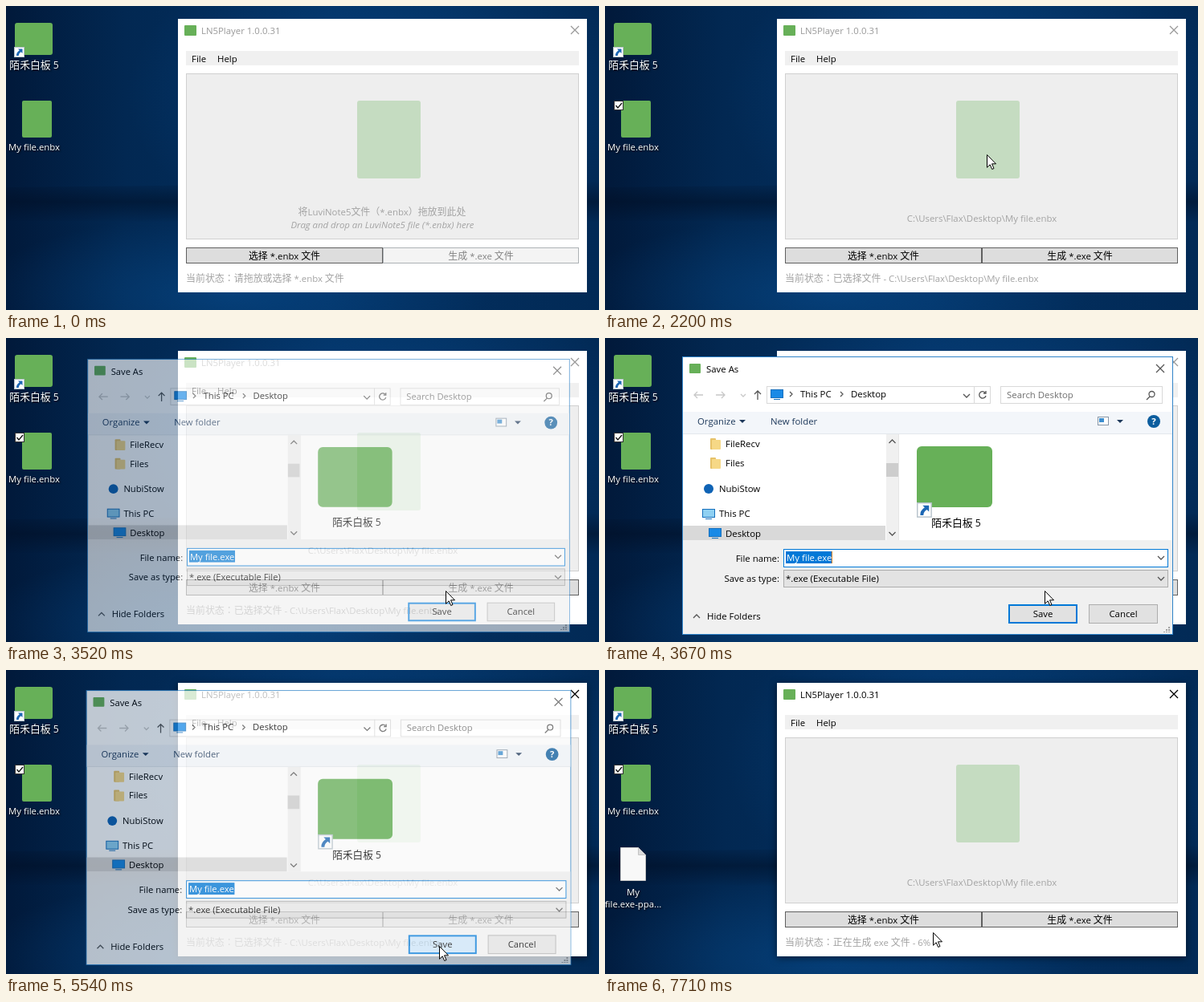
An HTML page that plays this animation: 738 px wide and 379 px high, repeating every 8000 ms.

```html
<!DOCTYPE html>
<html lang="zh-Hant">
<head>
<meta charset="utf-8">
<title>File packer demo</title>
<style>
  html, body { margin: 0; width: 100%; height: 100%; overflow: hidden; background: #021a3d; }
  svg { display: block; width: 738px; height: 379px; }
  text { font: 11.4px "Open Sans", "Noto Sans CJK TC", "Noto Sans CJK", sans-serif; white-space: pre; }
  .label { fill: #fff; text-anchor: middle; filter: drop-shadow(1px 1px 1px #000); }
  .name { font-size: 12.2px; }
  .mid { text-anchor: middle; }
  .end { text-anchor: end; }
  .dim { fill: #a3a3a3; }
  .navy { fill: #1e395b; }
  .line { fill: none; stroke: #555; stroke-width: 1.3; }
</style>
</head>
<body>
<svg id="stage" viewBox="0 0 738 379" xmlns="http://www.w3.org/2000/svg"></svg>
<script>
const LOOP = 8000;
const GREEN = '#67b058';
const BLUE = '#0078d7';

// [first change, last change, steps]
const changes = [
  [410, 1120, 10], [1270, 1650, 6], [2200, 2200, 1], [2430, 3120, 10],
  [3350, 3670, 5], [4070, 4070, 1], [4300, 4690, 6], [4840, 5150, 5],
  [5320, 5780, 7], [6310, 6390, 2], [6710, 7480, 11], [7550, 7710, 3]
].flatMap(([a, b, n]) => Array.from({ length: n }, (_, i) => Math.round(a + (b - a) * i / (n - 1 || 1))));

const cursorPath = [
  [410, 571, 349], [570, 470, 300], [800, 190, 190], [960, 60, 145], [1040, 34, 138],
  [1270, 34, 138], [1350, 90, 145], [1500, 350, 172], [1650, 474, 182],
  [2430, 476, 186], [2660, 515, 250], [2890, 543, 307], [3120, 547, 315],
  [4300, 547, 315], [4530, 492, 321], [4612, 492, 321], [4690, 489, 321],
  [4840, 496, 325], [5070, 538, 348], [5150, 539, 344],
  [6710, 539, 344], [7100, 480, 340], [7480, 422, 346], [7550, 420, 344], [7710, 408, 327]
];
const fade = [[3349, 0], [3350, .12], [3430, .38], [3510, .65], [3590, .88], [3670, 1],
  [5397, 1], [5473, .75], [5550, .5], [5627, .25], [5780, 0]];
const scale = [[3350, .95], [3510, .983], [3670, 1], [5397, 1], [5780, .94]];
const percentTimes = [6710, 6900, 7080, 7240, 7400, 7600];

function sample(keys, t) {
  const next = keys.findIndex(k => k[0] > t);
  if (next === 0) return keys[0].slice(1);
  if (next < 0) return keys[keys.length - 1].slice(1);
  const a = keys[next - 1], b = keys[next], p = (t - a[0]) / (b[0] - a[0]);
  return a.slice(1).map((v, i) => v + (b[i + 1] - v) * p);
}

const mixed = s => s.replace(/[\u3000-\u9fff\uff00-\uffef]+/g, m => `<tspan font-size="1.05em">${m}</tspan>`);
const text = (x, y, s, cls = '', more = '') => `<text x="${x}" y="${y}" class="${cls}" ${more}>${mixed(s)}</text>`;
const rect = (x, y, w, h, fill, more = '') => `<rect x="${x}" y="${y}" width="${w}" height="${h}" fill="${fill}" ${more}/>`;
const box = (x, y, w, h, fill, stroke, more = '') => rect(x + .5, y + .5, w - 1, h - 1, fill, `stroke="${stroke}" ${more}`);
const line = (d, more = '') => `<path d="${d}" class="line" ${more}/>`;
const chevron = (x, y, dy = 4) => line(`M${x - 4} ${y - dy / 2}l4 ${dy} 4 ${-dy}`);
const cross = (x, y, id = '') => line(`M${x - 5} ${y - 5}l10 10m0-10l-10 10`, id && `id="${id}"`);
const triangle = (x, y) => `<path d="M${x - 4} ${y - 2}h8l-4 4z" fill="#1e395b"/>`;
const monitor = (x, y, fill = '#1a8ae6') =>
  box(x, y, 16, 11, fill, '#1670bd') + rect(x + 4, y + 12, 8, 1, '#1670bd');
const folder = (x, y) => rect(x, y, 7, 14, '#e6c269', 'rx="1"') + rect(x + 2, y + 2, 11, 12, '#f6d886', 'rx="1"');
const shortcut = (x, y, s, id = '') => `<g transform="translate(${x} ${y}) scale(${s})" ${id && `id="${id}"`}>` +
  box(0, 0, 13, 13, '#fff', '#b8c4cc') +
  `<path d="M5 2.5h5.5V8L8.7 6.200Q6 7.500 5.700 11H3Q2.700 7 6.800 4.300z" fill="#1c67b4"/></g>`;

const wallpaper = `
  <defs>
    <linearGradient id="base">
      <stop offset="0" stop-color="#01193a"/><stop offset=".2" stop-color="#022852"/>
      <stop offset=".55" stop-color="#033061"/><stop offset="1" stop-color="#022a56"/>
    </linearGradient>
    <linearGradient id="sill" x2="0" y2="1">
      <stop offset="0" stop-color="#000d22" stop-opacity="0"/>
      <stop offset=".5" stop-color="#000d22" stop-opacity=".5"/>
      <stop offset="1" stop-color="#000d22" stop-opacity="0"/>
    </linearGradient>
    <radialGradient id="glow">
      <stop offset="0" stop-color="#0a5ca8" stop-opacity=".4"/>
      <stop offset="1" stop-color="#0a5ca8" stop-opacity="0"/>
    </radialGradient>
  </defs>
  ${rect(0, 0, 738, 379, 'url(#base)')}
  <ellipse cx="470" cy="110" rx="320" ry="190" fill="url(#glow)"/>
  <ellipse cx="280" cy="360" rx="320" ry="100" fill="url(#glow)"/>
  <path d="M0 226L738 218V270L0 268z" fill="url(#sill)"/>`;

const desktop = `
  ${rect(11, 21, 47, 40, GREEN, 'rx="3"')}${shortcut(10, 51, 1)}
  ${text(35, 78, '陌禾白板 5', 'label name')}
  <g id="highlight">${box(0, 115, 72, 70, '#8fbce8', '#b4d4f2', 'fill-opacity=".3" stroke-opacity=".55"')}</g>
  ${rect(20, 118, 37, 46, GREEN, 'rx="2"')}
  <g id="check">${box(11, 118, 12, 12, '#fff', '#333')}${line('M13.500 124l2.500 3 5-6', 'style="stroke:#111"')}</g>
  ${text(35, 180, 'My file.enbx', 'label')}
  <g id="output">
    <path d="M19.500 221.500h22l9 9v32h-31z" fill="#f8f8f8" stroke="#c4c4c4"/>
    <path d="M41.500 221.500v9h9z" fill="#dcdcdc" stroke="#c4c4c4"/>
    ${text(35, 281, 'My', 'label')}${text(35, 296, 'file.exe-ppa...', 'label')}
  </g>`;

const player = `
  <g>
    <rect id="shadow" x="214" y="16" width="509" height="341" style="filter:drop-shadow(0 2px 5px #0008)"/>
    ${rect(214, 16, 509, 341, '#fff')}
    ${rect(222, 24, 15, 13, GREEN, 'rx="1"')}
    ${text(243, 35, 'LN5Player 1.0.0.31', '', 'id="title"')}${cross(708, 30, 'close')}
    ${rect(224, 56, 489, 18, '#f0f0f0')}${text(231, 70, 'File')}${text(263, 70, 'Help')}
    ${box(224, 84, 489, 207, '#eee', '#d0d0d0')}
    <g id="page">${rect(437, 118, 79, 97, '#c5dcc1', 'rx="3"')}</g>
    <g id="hint">
      ${text(468, 261, '将LuviNote5文件（*.enbx）拖放到此处', 'mid dim')}
      ${text(468.5, 277, 'Drag and drop an LuviNote5 file (*.enbx) here', 'mid dim', 'style="font-style:italic"')}
    </g>
    ${text(469, 269, 'C:\\Users\\Flax\\Desktop\\My file.enbx', 'mid dim', 'id="path"')}
    ${box(224, 301, 245, 20, '#ddd', '#606060')}${text(346.5, 316, '选择 *.enbx 文件', 'mid')}
    <g id="make">${box(469, 301, 244, 20, '#ddd', '#606060')}${text(591, 316, '生成 *.exe 文件', 'mid')}</g>
    ${text(224, 344, '', 'dim', 'id="status"')}
  </g>`;

const dialog = `
  <g id="dialog">
    ${box(96, 23, 611, 347, '#fff', '#2f83c8')}
    ${rect(105, 32, 14, 12, GREEN, 'rx="1"')}${text(126, 43, 'Save As')}${cross(691, 38)}
    ${line('M122 71h-11m4-4l-4 4 4 4M138 71h11m-4-4l4 4-4 4', 'style="stroke:#c8c8c8"')}
    ${line('M169 70l3 3 3-3', 'style="stroke:#c8c8c8"')}${line('M190 77v-11m-4 4l4-4 4 4')}
    ${box(201, 60, 279, 22, '#fff', '#d9d9d9')}${line('M459.500 60v22', 'style="stroke:#d9d9d9;stroke-width:1"')}
    ${monitor(206, 64)}${line('M230 67l3 3-3 3M293 67l3 3-3 3')}
    ${text(243, 74, 'This PC')}${text(306, 74, 'Desktop')}${chevron(450, 72)}
    ${line('M473 68a4.200 4.200 0 1 0 1 4M474 66v3h-3')}
    ${box(492, 60, 202, 22, '#fff', '#d9d9d9')}${text(500, 75, 'Search Desktop', '', 'fill="#707070"')}
    ${line('M678 73l-4 4M684 70a3.500 3.500 0 1 1-7 0a3.500 3.500 0 1 1 7 0')}
    ${rect(97, 92, 609, 27, '#f3f6fa')}${rect(97, 119, 609, 1, '#e3e7ec')}
    ${text(115, 108, 'Organize', 'navy')}${triangle(171, 104)}${text(206, 108, 'New folder', 'navy')}
    ${box(613, 98, 14, 11, '#fff', '#8796a6')}${rect(615, 100, 6, 5, '#3c8ed0')}${triangle(641, 104)}
    <circle cx="683" cy="104" r="8" fill="#0c5d9e"/>${text(683, 108, '?', 'mid', 'fill="#fff" style="font-weight:700"')}
    ${rect(97, 234, 252, 18, '#d9d9d9')}
    ${folder(131, 125)}${text(150, 136, 'FileRecv')}${folder(131, 149)}${text(150, 160, 'Files')}
    <circle cx="129" cy="188" r="6" fill="#0f63b5"/>${text(142, 192, 'NubiStow')}
    ${monitor(121, 213, '#8fd0f2')}${text(142, 223, 'This PC')}
    ${monitor(129, 237)}${text(150, 248, 'Desktop')}
    ${rect(350, 120, 15, 132, '#f0f0f0')}${rect(350, 156, 15, 17, '#cdcdcd')}
    ${chevron(357.5, 129, -4)}${chevron(357.5, 244)}${rect(365, 120, 1, 132, '#e6e6e6')}
    ${rect(388, 135, 94, 76, GREEN, 'rx="6"')}${shortcut(388, 205, 1.45, 'badge')}
    ${text(437, 235, '陌禾白板 5', 'mid name')}
    ${rect(97, 252, 609, 117, '#f0f0f0')}
    ${text(217, 279, 'File name:', 'end')}${box(222, 263, 479, 23, '#fff', BLUE)}
    ${rect(225, 266, 58, 15, BLUE)}${text(226, 278, 'My file.exe', '', 'fill="#fff"')}
    ${rect(282, 266, 1, 15, '#ff8728', 'id="caret"')}${chevron(692, 274)}
    ${text(217, 304, 'Save as type:', 'end')}${box(222, 289, 479, 22, '#e3e3e3', '#adadad')}
    ${text(225, 304, '*.exe (Executable File)')}${chevron(692, 300)}
    ${chevron(114, 347, -4)}${text(127, 351, 'Hide Folders')}
    <rect id="save" x="503" y="333" width="84" height="22" stroke="${BLUE}" stroke-width="2"/>
    ${text(545, 348, 'Save', 'mid')}
    ${box(602, 332, 86, 24, '#e1e1e1', '#adadad')}${text(645, 348, 'Cancel', 'mid')}
    <path d="M702 360v7M699 363v4M696 366v1" stroke="#a0a0a0" stroke-width="2" stroke-dasharray="2 1"/>
  </g>`;

const pointer = `
  <g id="ghost" opacity=".6">${rect(-14, -20, 37, 46, GREEN, 'rx="2"')}</g>
  <path id="cursor" d="M.5.5V16.300L4.200 12.800 6.700 18.500 9 17.500 6.500 11.800H11.500Z" fill="#fff" stroke="#000"/>`;

const stage = document.getElementById('stage');
stage.innerHTML = wallpaper + desktop + player + dialog + pointer;
const el = Object.fromEntries([...stage.querySelectorAll('[id]')].map(e => [e.id, e]));
const show = (e, on) => { e.style.visibility = on ? 'visible' : 'hidden'; };
const zoom = (e, x, y, s) => e.setAttribute('transform', `translate(${x} ${y}) scale(${s}) translate(${-x} ${-y})`);
const [makeBox, makeText] = el.make.children;

function render(time) {
  const t = changes.reduce((last, c) => c <= time ? c : last, 0);
  const within = (a, b) => t >= a && t < b;
  const loaded = t >= 1570;

  const [x, y] = sample(cursorPath, t);
  for (const e of [el.cursor, el.ghost]) e.setAttribute('transform', `translate(${Math.round(x)} ${Math.round(y)})`);
  show(el.cursor, t >= 410);
  show(el.ghost, within(1340, 1640));

  show(el.highlight, within(1030, 1340));
  show(el.check, t >= 1030);
  show(el.output, t >= 6780);

  const active = within(2960, 3350) || t >= 5390;
  el.title.setAttribute('fill', active ? '#000' : '#999');
  el.close.style.stroke = active ? '#000' : '#999';
  show(el.shadow, active);

  zoom(el.page, 468.5, 166.5, within(1490, 2200) ? 1.2 : 1);
  show(el.hint, !loaded);
  show(el.path, loaded);

  const pressed = within(2960, 3040), hover = within(2880, 3350);
  makeBox.setAttribute('fill', !loaded ? '#f4f4f4' : pressed ? '#c4e5f6' : hover ? '#bee6fd' : '#ddd');
  makeBox.setAttribute('stroke', !loaded ? '#adb2b5' : hover ? '#3c7fb1' : '#606060');
  makeText.setAttribute('fill', loaded ? '#000' : '#838383');

  const percent = percentTimes.filter(p => p <= t).length;
  const status = t >= 6310 ? `正在生成 exe 文件 - ${percent}%`
    : loaded ? '已选择文件 - C:\\Users\\Flax\\Desktop\\My file.enbx' : '请拖放或选择 *.enbx 文件';
  el.status.innerHTML = mixed('当前状态：' + status);

  const [opacity] = sample(fade, t);
  el.dialog.style.opacity = opacity;
  el.dialog.style.display = opacity > 0 ? '' : 'none';
  zoom(el.dialog, 401.5, 196.5, sample(scale, t)[0]);
  show(el.badge, t >= 3590);
  el.caret.style.opacity = +(within(3580, 4070) || within(4530, 5140));
  el.save.setAttribute('fill', within(5390, 5480) ? '#cce4f7' : t >= 5060 ? '#e5f1fb' : '#e1e1e1');
}

function tick() {
  render(performance.now() % LOOP);
  requestAnimationFrame(tick);
}
tick();
</script>
</body>
</html>
```
